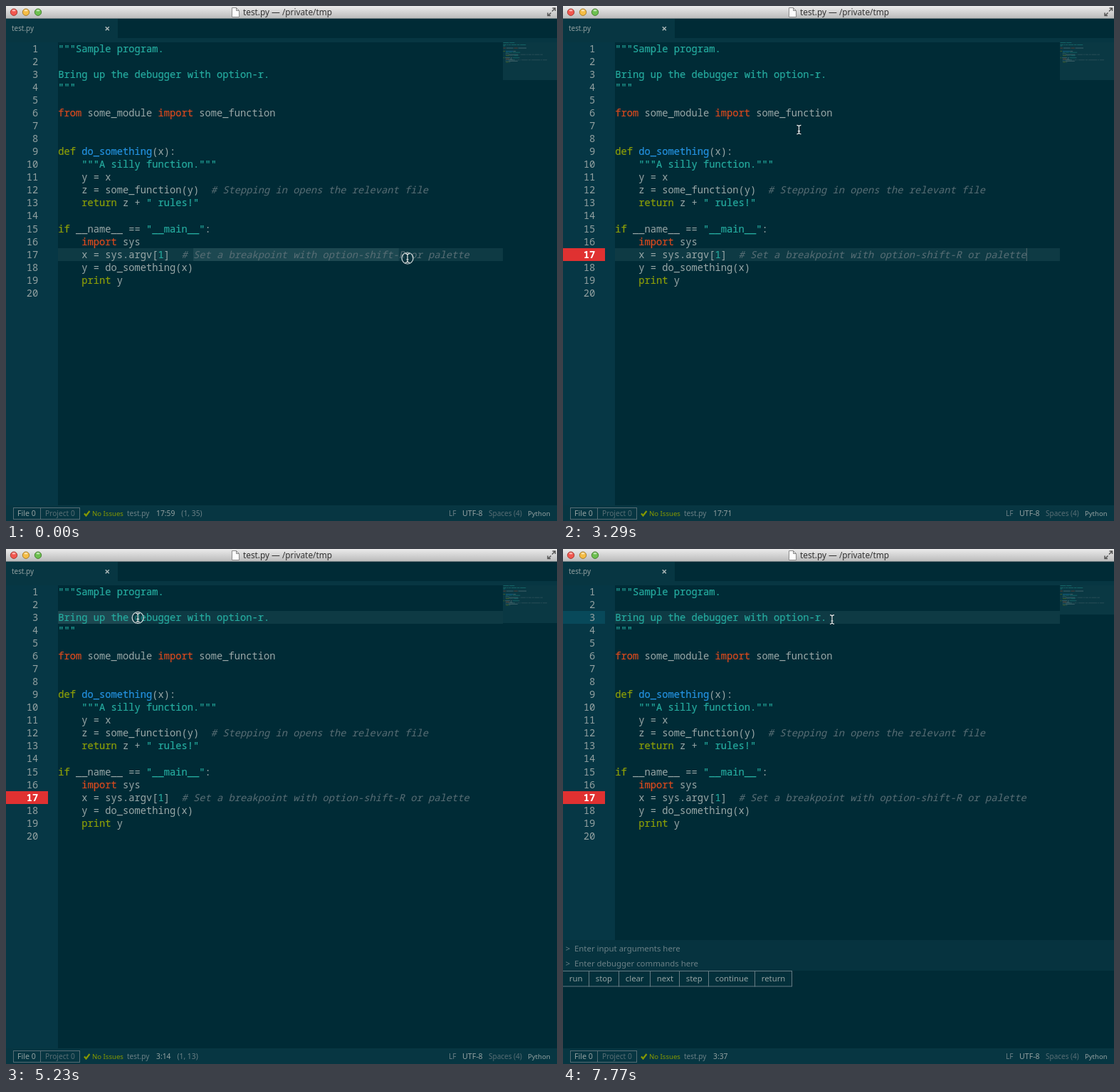
An HTML page for the animation above (8 s loop, 774x723 px).

```html
<!DOCTYPE html>
<html lang="en">
<head>
<meta charset="utf-8">
<title>Editor session</title>
<style>
  html, body { margin: 0; width: 100%; height: 100%; overflow: hidden; background: #002b36; }
  svg { display: block; width: 774px; height: 723px; }
  text { white-space: pre; font-family: "Noto Sans", "Open Sans", sans-serif; }
  .code text { font: 13.75px "Noto Sans Mono", "DejaVu Sans Mono", monospace; }
  .code .c { font-style: italic; }
  .code .i, .code .f, .code .k, .code .s { stroke: currentColor; stroke-width: .2; }
</style>
</head>
<body>
<svg id="stage" viewBox="0 0 774 723">
  <defs>
    <linearGradient id="bar" x2="0" y2="1">
      <stop stop-color="#ebebeb"/><stop offset="1" stop-color="#b9b9b9"/>
    </linearGradient>
  </defs>
</svg>
<script>
const LOOP = 8000, STEP = 149.6, LEFT = 73.3, CHAR = 8.25, TOP = 51.2, ROW = 18.05;
const PALE = '#073642', GUTTER = '#063745', BASE = '#002b36';
const DIM = '#586e75', MID = '#6b8086', TEXT = '#93a1a1';
const COLORS = { d: '#9aa8a8', s: '#25ab9f', k: '#8c9f08', i: '#dc4a1e', f: '#2492e0', c: DIM };

// Each line alternates a token class and its text.
const SOURCE = [
  's|"""Sample program.', '', 's|Bring up the debugger with option-r.', 's|"""', '',
  'i|from|d| some_module |i|import|d| some_function', '', '',
  'k|def|d| |f|do_something|d|(x):',
  'd|    |s|"""A silly function."""',
  'd|    y = x',
  'd|    z = some_function(y)  |c|# Stepping in opens the relevant file',
  'd|    |k|return|d| z + |s|" rules!"', '',
  'k|if|d| __name__ == |s|"__main__"|d|:',
  'd|    |i|import|d| sys',
  'd|    x = sys.argv[|s|1|d|]  |c|# Set a breakpoint with option-shift-R or palette',
  'd|    y = do_something(x)',
  'd|    |k|print|d| y', ''
];

const CLICK_A = 7, BREAK = 18, PRESS = 31, CLICK_B = 42, PANEL = 50;
const PRESSES = [[-1, 4], [CLICK_A, CLICK_A], [PRESS, 38], [CLICK_B, CLICK_B]];

const clamp = v => Math.min(1, Math.max(0, v));
const lerp = (a, b, p) => a + (b - a) * p;
const span = (k, from, to) => clamp((k - from) / (to - from));
const easeOut = power => p => 1 - (1 - p) ** power;
const smooth = p => p * p * p * (p * (6 * p - 15) + 10);

const stage = document.getElementById('stage');
const lineTop = n => Math.round(TOP + (n - 1) * ROW);
const colX = c => LEFT + c * CHAR;

function set(node, attrs) {
  for (const key in attrs) node.setAttribute(key, attrs[key]);
  return node;
}
function add(parent, tag, attrs) {
  return parent.appendChild(set(document.createElementNS('http://www.w3.org/2000/svg', tag), attrs));
}
const group = (parent, attrs) => add(parent, 'g', attrs);
const rect = (parent, x, y, width, height, fill, more) =>
  add(parent, 'rect', { x, y, width, height, fill, ...more });
const path = (parent, d, stroke, width, more) =>
  add(parent, 'path', { d, stroke, 'stroke-width': width, fill: 'none', ...more });
function label(parent, x, y, str, size, fill, more) {
  const node = add(parent, 'text', { x, y, 'font-size': size, fill, color: fill, ...more });
  node.textContent = str;
  return node;
}
const show = (node, on) => set(node, { visibility: on ? 'visible' : 'hidden' });

// Window frame and tab
rect(stage, 0, 0, 774, 723, BASE);
rect(stage, 0, 0, 774, 18, 'url(#bar)');
rect(stage, 0, 17, 774, 1, '#6d7c80');
[['#f2574f', '#a8382f'], ['#f5bd45', '#a87c26'], ['#6cc04f', '#467f31']].forEach(([fill, stroke], i) => {
  add(stage, 'circle', { cx: 11 + 17 * i, cy: 8.7, r: 4.7, fill, stroke });
  add(stage, 'ellipse', { cx: 11 + 17 * i, cy: 6.3, rx: 2.5, ry: 1.3, fill: '#fff', opacity: .55 });
});
path(stage, 'M317.5 2.5h6l4 4v9h-10zM323.5 2.5v4h4', '#8b8b8b', 1, { fill: '#fdfdfd' });
label(stage, 333, 13, 'test.py — /private/tmp', 11.8, '#333');
path(stage, 'M767 7.5l4-4M767.5 3h4v4M765.5 9.5l-4 4M761 9.5v4h4', '#555', 1.5);
rect(stage, 0, 18, 157, 28, PALE);
rect(stage, 0, 45, 774, 6, PALE);
label(stage, 8, 35, 'test.py', 9.9, TEXT);
path(stage, 'M139.8 29.3l5 5m0-5l-5 5', '#a9b5b5', 1.6);

// Editor
rect(stage, 0, 51, 73, 650, GUTTER);
const rowBand = rect(stage, 73, 0, 625, 18, '#0e3a44');
const gutterBand = rect(stage, 0, 0, 59, 18, '#08495a');
const selection = rect(stage, 0, 0, 0, 18, '#1d4851');
const breakpoint = rect(stage, 0, lineTop(17), 59, 18, '#e03131');
const slider = rect(stage, 698, 51, 76, 53, '#0a3843');
const code = group(stage, { class: 'code' });
const minimap = group(stage, { opacity: .42 });
const numbers = SOURCE.map((line, i) => {
  const base = TOP + i * ROW + 13.6, parts = line.split('|');
  for (let p = 0, col = 0; p + 1 < parts.length; p += 2) {
    const kind = parts[p], str = parts[p + 1];
    label(code, colX(col), base, str, 13.75, COLORS[kind], { class: kind });
    for (const word of str.matchAll(/\S+/g))
      rect(minimap, 698.5 + (col + word.index) * .88, 51 + i * 1.52, word[0].length * .88, .9, COLORS[kind]);
    col += str.length;
  }
  return label(code, 45.3, base, i + 1, 13.75, TEXT, { 'text-anchor': 'end' });
});
const caret = rect(stage, 0, 0, 1, 18, '#566b70');

// Debugger panel
const panel = group(stage);
rect(panel, 0, 549, 774, 152, BASE);
rect(panel, 0, 549, 774, 43, '#06333f');
['input arguments', 'debugger commands'].forEach((what, i) => {
  label(panel, 3.5, 565 + i * 20.5, '>', 11.4, MID);
  label(panel, 16, 565 + i * 20.5, `Enter ${what} here`, 11.4, MID);
});
let edge = -.5;
for (const name of ['run', 'stop', 'clear', 'next', 'step', 'continue', 'return']) {
  const box = rect(panel, edge, 592.5, 0, 21.5, '#03303b', { stroke: '#657b83' });
  const word = label(panel, edge + 9.3, 607, name, 11.3, TEXT);
  const width = Math.round(word.getComputedTextLength() + 18.3);
  set(box, { width });
  edge += width;
}

// Status bar
rect(stage, 0, 701, 774, 22, PALE);
rect(stage, 10.5, 704.5, 38, 16, 'none', { stroke: '#566d75' });
rect(stage, 48.5, 704.5, 55, 16, 'none', { stroke: '#566d75' });
path(stage, 'M110 712.5l2.5 3 5-6.5', '#859900', 2.2);
const status = (x, str, fill, size = 10) => label(stage, x, 716, str, size, fill);
status(16, 'File 0', TEXT, 10.6);
status(55, 'Project 0', DIM, 10.2);
status(121, 'No Issues', '#859900', 9.6);
status(170, 'test.py', MID);
status(622, 'LF', MID);
status(641, 'UTF-8', TEXT, 10.6);
status(678, 'Spaces (4)', DIM);
status(733, 'Python', TEXT, 9.5);
const position = status(211, '', TEXT, 10.3);
const place = add(position, 'tspan', {});
const extent = add(position, 'tspan', { dx: 9, fill: MID });

// Pointer
const pointer = group(stage);
const ring = add(pointer, 'circle', { fill: BASE, 'fill-opacity': .35, stroke: '#dbe2e2', 'stroke-width': 1.2 });
const beam = 'M-3-6.3Q0-6 0-4.5Q0-6 3-6.3M0-4.5V4.5M-3 6.3Q0 6 0 4.5Q0 6 3 6.3M-1.6 2h3.2';
path(pointer, beam, '#001a21', 2.4, { opacity: .6 });
path(pointer, beam, '#eef2f2', 1.2);

// Drag along line 17, travel up to line 3, drag along it.
function pointerAt(k) {
  const first = easeOut(3)(span(k, 0, 5)), travel = span(k, 19, 29), second = smooth(span(k, 32, 39));
  if (k < 19) return [lerp(564, 660, first), lerp(354, 350, first)];
  if (k < 32) return [lerp(660, 73, easeOut(2.3)(travel)), lerp(350, 95, easeOut(3.3)(travel))];
  return [lerp(73, 378, second), lerp(95, 99, second)];
}

function caretAt(k) {
  if (k < PRESS) {
    const col = Math.round(lerp(58, 70, easeOut(3)(span(k, 0, 5))));
    return { line: 17, col, from: k < CLICK_A ? 23 : col };
  }
  const col = Math.round(36 * smooth(span(k, 32, 39)));
  return { line: 3, col, from: k < CLICK_B ? 0 : col };
}

// Blinking starts about two ticks after a click and toggles every 2.62 ticks.
function caretOn(k) {
  if (k >= PRESS && k < CLICK_B) return false;
  const idle = k - (k < PRESS ? CLICK_A : CLICK_B) - 1.95;
  return idle > 0 && Math.ceil(idle / 2.62) % 2 === 1;
}

function draw(t) {
  const k = Math.floor((t + 10) / STEP);
  const [x, y] = pointerAt(k), { line, col, from } = caretAt(k);
  const press = PRESSES.find(([a, b]) => k >= a && k <= b);
  const top = lineTop(line), selected = col - from, broken = k >= BREAK, open = k >= PANEL;

  set(pointer, { transform: `translate(${x} ${y})` });
  set(ring, { r: press && k === press[0] ? 10.5 : 8 });
  show(ring, press);

  set(rowBand, { y: top });
  set(gutterBand, { y: top });
  show(gutterBand, !selected);
  set(selection, { x: colX(from), y: top, width: selected * CHAR });
  set(caret, { x: colX(col), y: top });
  show(caret, caretOn(k));

  show(breakpoint, broken);
  set(numbers[16], { fill: broken ? '#fff' : TEXT, style: broken ? 'font-weight:bold' : '' });
  place.textContent = `${line}:${col + 1}`;
  extent.textContent = selected ? `(1, ${selected})` : '';
  show(panel, open);
  set(slider, { height: open ? 41 : 53 });
}

const start = performance.now();
function tick() {
  draw((performance.now() - start) % LOOP);
  requestAnimationFrame(tick);
}
tick();
</script>
</body>
</html>
```
